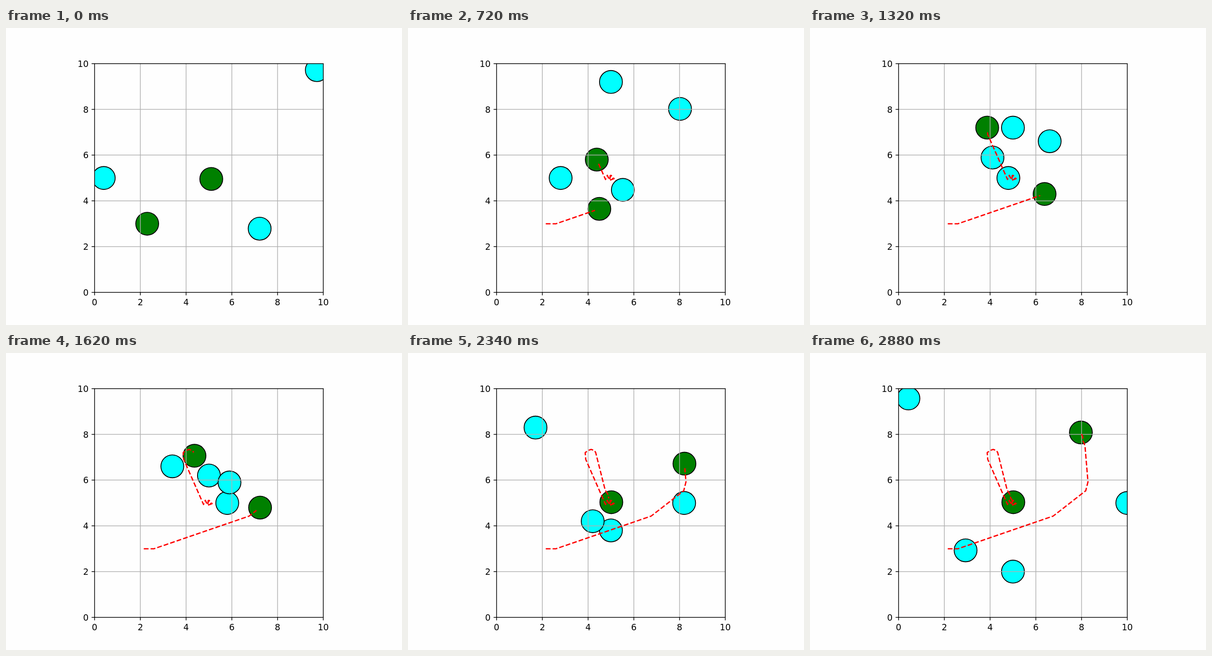
Recreate the animation shown at these times as an HTML page with a canvas. Size 864x648 px, loop 2940 ms.

```html
<!DOCTYPE html>
<html lang="en">
<head>
<meta charset="utf-8">
<title>Robots avoiding moving obstacles</title>
<style>
html, body { margin: 0; width: 100%; height: 100%; overflow: hidden; background: #fefefe; }
canvas { display: block; }
</style>
</head>
<body>
<canvas id="stage" width="864" height="648"></canvas>
<script>
const ctx = document.getElementById('stage').getContext('2d');
const STEP_MS = 60, FRAMES = 49;
const SPEED = 0.2;      // units per step
const CLEARANCE = 1.1;  // wanted distance between centres
const HEADINGS = 19, SPEEDS = 4;

const UNIT = 49.896, LEFT = 193.32, BOTTOM = 576.72, SIZE = 10 * UNIT;
const px = x => LEFT + UNIT * x;
const py = y => BOTTOM - UNIT * y;
const polar = (r, angle) => [r * Math.cos(angle), r * Math.sin(angle)];

function obstacle(x, y, angle) {
  const v = polar(SPEED, angle);
  return { v, at: n => [x + v[0] * n, y + v[1] * n] };
}

const obstacles = [
  obstacle(5, 12, -Math.PI / 2),
  obstacle(0, 5, 0),
  obstacle(10, 10, -Math.PI * 3 / 4),
  obstacle(7.5, 2.5, Math.PI * 3 / 4)
];

// Does velocity v, seen from the obstacle, point into its collision cone?
function collides(pos, v, ob, n) {
  const [ox, oy] = ob.at(n);
  const dx = ox - pos[0], dy = oy - pos[1], dist = Math.hypot(dx, dy);
  const rx = v[0] - ob.v[0], ry = v[1] - ob.v[1];
  const sine = Math.min(1, CLEARANCE / dist);
  return dx * rx + dy * ry > 0 &&
    Math.abs(dx * ry - dy * rx) / dist < sine * Math.hypot(rx, ry);
}

// Full speed to the goal, or rest once close enough
function desired(pos, goal) {
  const dx = goal[0] - pos[0], dy = goal[1] - pos[1], dist = Math.hypot(dx, dy);
  return dist < 0.0999 ? [0, 0] : [dx / dist * SPEED, dy / dist * SPEED];
}

// The safe sampled velocity nearest to the desired one
function chooseVelocity(pos, goal, n) {
  const want = desired(pos, goal);
  let best = [0, 0], least = Infinity;
  for (let h = 0; h < HEADINGS; h++) {
    for (let s = 0; s <= SPEEDS; s++) {
      const v = polar(SPEED * s / SPEEDS, 2 * Math.PI * h / HEADINGS);
      const gap = Math.hypot(v[0] - want[0], v[1] - want[1]);
      if (gap < least - 1e-9 && !obstacles.some(ob => collides(pos, v, ob, n))) {
        best = v;
        least = gap;
      }
    }
  }
  return best;
}

function simulate(start, goal) {
  const path = [start];
  for (let n = 1; n <= FRAMES + 1; n++) {
    const [x, y] = path[n - 1], v = chooseVelocity([x, y], goal, n);
    path.push([x + v[0], y + v[1]]);
  }
  return path;
}

const robots = [simulate([2, 3], [8, 8]), simulate([5, 5], [5, 5])];

function disc([x, y], color) {
  ctx.beginPath();
  ctx.arc(px(x), py(y), UNIT / 2, 0, 2 * Math.PI);
  ctx.fillStyle = color;
  ctx.fill();
  ctx.strokeStyle = '#000';
  ctx.lineWidth = 1.875;
  ctx.stroke();
}

function polyline(points) {
  ctx.beginPath();
  points.forEach(([x, y]) => ctx.lineTo(x, y));
  ctx.stroke();
}

function draw(n) {
  ctx.fillStyle = '#fefefe';
  ctx.fillRect(0, 0, 864, 648);

  ctx.save();
  ctx.beginPath();
  ctx.rect(LEFT, py(10), SIZE, SIZE);
  ctx.clip();
  robots.forEach(path => disc(path[n], '#008000'));
  obstacles.forEach(ob => disc(ob.at(n), '#0ff'));

  ctx.strokeStyle = '#b0b0b0';
  ctx.lineWidth = 1.5;
  for (let v = 2; v < 10; v += 2) {
    polyline([[px(v), py(0)], [px(v), py(10)]]);
    polyline([[px(0), py(v)], [px(10), py(v)]]);
  }

  ctx.strokeStyle = '#f00';
  ctx.lineWidth = 2.8125;
  ctx.lineJoin = 'round';
  ctx.setLineDash([10.41, 4.5]);
  robots.forEach(path => polyline(path.slice(1, n).map(([x, y]) => [px(x), py(y)])));
  ctx.restore();

  // Frame, ticks and labels
  ctx.strokeStyle = ctx.fillStyle = '#000';
  ctx.lineWidth = 1.5;
  ctx.strokeRect(LEFT, py(10), SIZE, SIZE);
  ctx.font = '18.75px "DejaVu Sans", sans-serif';
  for (let v = 0; v <= 10; v += 2) {
    const x = px(v), y = py(v);
    polyline([[x, BOTTOM], [x, BOTTOM + 6.56]]);
    polyline([[LEFT, y], [LEFT - 6.56, y]]);
    ctx.textAlign = 'center';
    ctx.fillText(v, x, 604.5);
    ctx.textAlign = 'right';
    ctx.fillText(v, 180.2, y + 7.1);
  }
}

let start;
function tick(now) {
  start ??= now;
  draw(Math.floor((now - start) / STEP_MS) % FRAMES + 2);
  requestAnimationFrame(tick);
}
draw(2);
requestAnimationFrame(tick);
</script>
</body>
</html>
```
